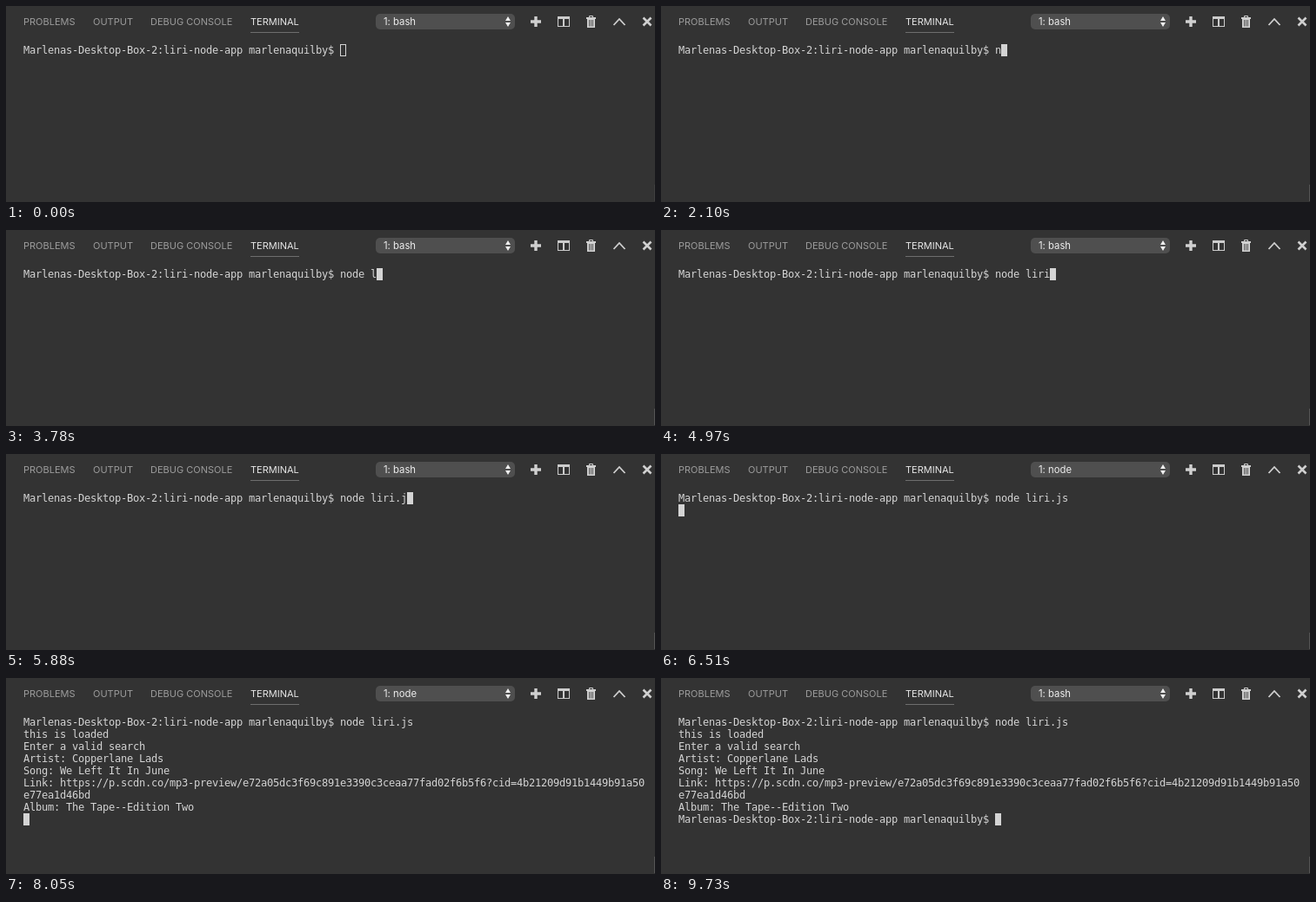
Recreate the animation shown at these times as an HTML page. Size 746x226 px, loop 9940 ms.

```html
<!DOCTYPE html>
<html lang="en">
<head>
<meta charset="utf-8">
<title>Terminal session</title>
<style>
  html, body { margin: 0; width: 100%; height: 100%; overflow: hidden; background: #333; }
  body { position: relative; font: 11px/14px Inter, "Open Sans", sans-serif; color: #9c9c9c; }
  .tab, #shell, #screen, #cursor, #slider, svg { position: absolute; }
  .tab { top: 11px; white-space: nowrap; }
  .tab.active { color: #e7e7e7; padding-bottom: 5px; border-bottom: 1px solid #6e6e6e; }
  #shell {
    left: 425px; top: 9px; width: 151px; height: 18px; padding-left: 9px;
    border-radius: 5px; background: #4f4f4f; color: #eee; font-size: 11.3px; line-height: 18px;
  }
  svg { left: 0; top: 0; }
  #screen {
    left: 20px; top: 44px; margin: 0; color: #d4d4d4;
    font: 12px/14px "DejaVu Sans Mono", monospace;
    letter-spacing: calc(7px - 1ch); /* 7px terminal cells */
    font-variant-ligatures: none;
  }
  #cursor { box-sizing: border-box; width: 7px; height: 14px; border: 1px solid #d4d4d4; }
  #cursor.focused { background: #d4d4d4; }
  #slider { left: 745px; top: 206px; width: 1px; height: 19px; background: #3f3f3f; }
  #slider.lit { background: #555; }
</style>
</head>
<body>
  <div class="tab" style="left:20px">PROBLEMS</div>
  <div class="tab" style="left:100px">OUTPUT</div>
  <div class="tab" style="left:166px">DEBUG CONSOLE</div>
  <div class="tab active" style="left:281px">TERMINAL</div>
  <div id="shell">1: bash</div>

  <svg width="746" height="40" fill="none" stroke="#d0d0d0">
    <path fill="#eee" stroke="none" d="M574 17l3-5 3 5zM574 19l3 5 3-5z"/>
    <path stroke-width="3.4" d="M603 18h12M609 12v12"/>
    <path fill="#ccc" stroke="none" fill-rule="evenodd"
      d="M634 12h14v12h-14zM635 15v8h5v-8zM642 15v8h5v-8z"/>
    <path fill="#d0d0d0" stroke="none" d="M667 13h11v2h-11zM668 15h9v10h-9z"/>
    <path d="M670.5 13v-1.500h4V13"/>
    <path stroke="#333" stroke-width=".8" d="M670.5 16v7.500M672.500 16v7.500M674.500 16v7.500"/>
    <path stroke-width="1.8" d="M698.500 22l6.500-7 6.500 7"/>
    <path stroke-width="2.6" d="M732.500 13.500l9 9M741.500 13.500l-9 9"/>
  </svg>

  <pre id="screen"></pre>
  <div id="cursor"></div>
  <div id="slider"></div>

<script>
  const LOOP = 9940;
  const CELL = { width: 7, height: 14 };
  const ORIGIN = { x: 20, y: 44 };
  const PROMPT = 'Marlenas-Desktop-Box-2:liri-node-app marlenaquilby$ ';
  const COMMAND = 'node liri.js';
  const KEY_TIMES = [2100, 2240, 2380, 2520, 2800, 3780, 3990, 4200, 4970, 5250, 5810, 6020];

  const OUTPUT = [
    [6370, '\n'],
    [6790, 'this is loaded\n'],
    [7490, 'Enter a valid search\n'],
    [8050, [
      'Artist: Copperlane Lads',
      'Song: We Left It In June',
      'Link: https://p.scdn.co/mp3-preview/e72a05dc3f69c891e3390c3ceaa77fad02f6b5f6?cid=4b21209d91b1449b91a50',
      'e77ea1d46bd',
      'Album: The Tape--Edition Two',
      ''
    ].join('\n')],
    [8120, PROMPT]
  ];

  const [shell, screen, cursor, slider] =
    ['shell', 'screen', 'cursor', 'slider'].map(id => document.getElementById(id));

  function terminalText(t) {
    const typed = KEY_TIMES.filter(time => t >= time).length;
    const printed = OUTPUT.filter(([time]) => t >= time).map(([, text]) => text);
    return PROMPT + COMMAND.slice(0, typed) + printed.join('');
  }

  function render(t) {
    const text = terminalText(t);
    const lines = text.split('\n');
    if (screen.textContent !== text) screen.textContent = text;

    cursor.style.left = ORIGIN.x + lines.at(-1).length * CELL.width + 'px';
    cursor.style.top = ORIGIN.y + (lines.length - 1) * CELL.height + 'px';
    cursor.classList.toggle('focused', t >= 1610);

    slider.classList.toggle('lit', t >= 1330);
    shell.textContent = t >= 6510 && t < 8190 ? '1: node' : '1: bash';
  }

  const start = performance.now();
  function tick() {
    render((performance.now() - start) % LOOP);
    requestAnimationFrame(tick);
  }
  tick();
</script>
</body>
</html>
```
